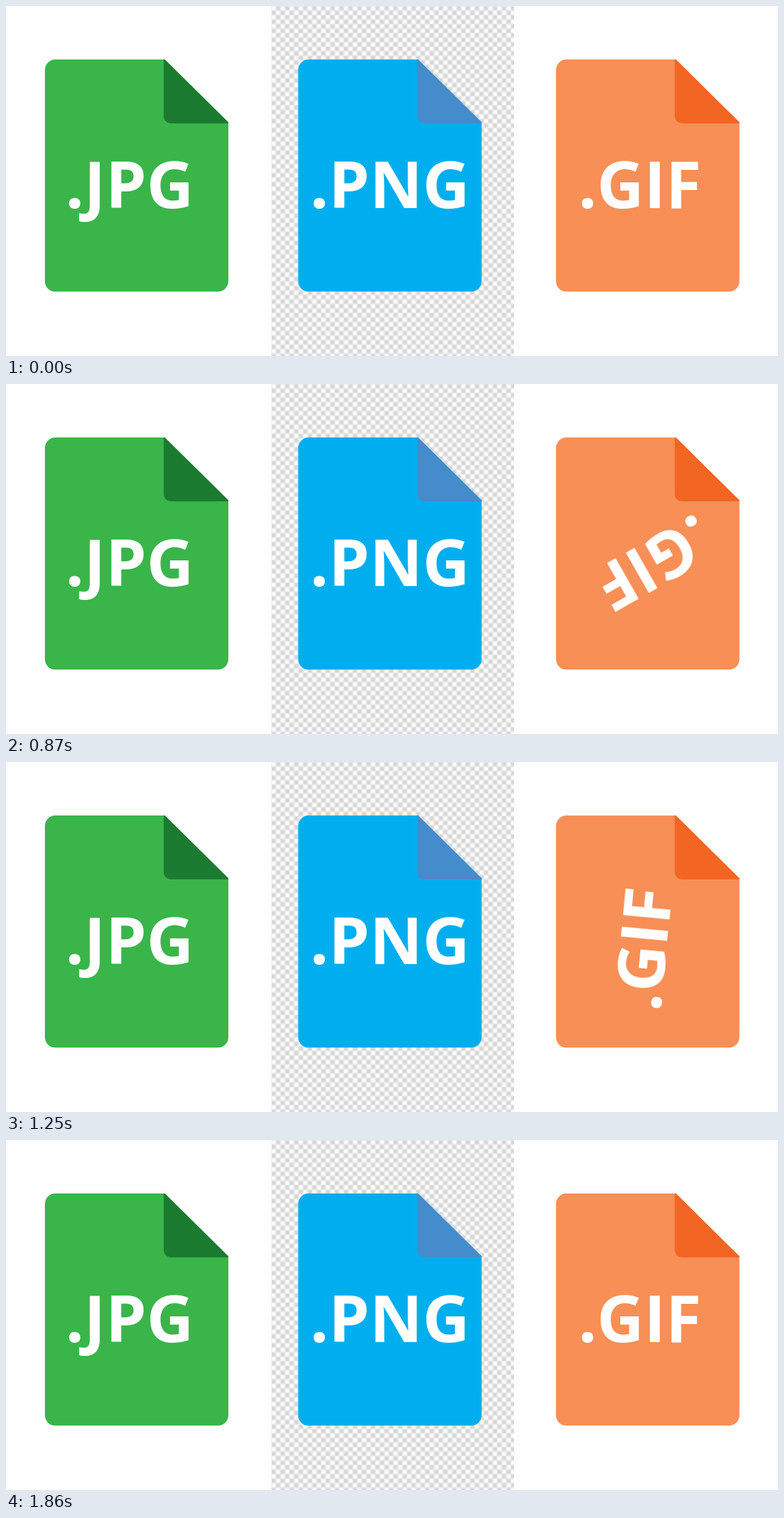
An HTML page without scripts for the animation above (3460 ms loop, 1111 by 504 pixels).

```html
<!DOCTYPE html>
<html lang="en">
<head>
<meta charset="utf-8">
<title>File types</title>
<style>
  html, body { margin: 0; width: 100%; height: 100%; overflow: hidden; background: #fefefe; }
  svg { display: block; width: 100%; height: 100%; }
  text { font: 700 93.8px "Open Sans", sans-serif; font-kerning: none; fill: #fff; }

  .spin { animation: spin 3460ms infinite; }

  /* the label tumbles once, in hard steps, drifting around its centre */
  @keyframes spin {
    0%      { transform: translate(912px, 258px) rotate(0deg);      animation-timing-function: step-end; }
    14.739% { transform: translate(917px, 247px) rotate(24deg);     animation-timing-function: steps(4); }
    21.387% { transform: translate(939.5px, 242.5px) rotate(104deg); animation-timing-function: step-end; }
    23.699% { transform: translate(938px, 250px) rotate(132deg);    animation-timing-function: steps(3); }
    28.034% { transform: translate(924.5px, 272px) rotate(187deg);  animation-timing-function: steps(4); }
    33.525% { transform: translate(925px, 269px) rotate(243.5deg);  animation-timing-function: step-end; }
    34.682% { transform: translate(922px, 271px) rotate(259deg);    animation-timing-function: steps(4); }
    40.173% { transform: translate(903px, 263px) rotate(324.5deg);  animation-timing-function: steps(2); }
    43.063%, 100% { transform: translate(912px, 258px) rotate(360deg); }
  }
</style>
</head>
<body>
<svg viewBox="0 0 1111 504" preserveAspectRatio="none">
  <defs>
    <pattern id="checker" x="388.500" width="13" height="13" patternUnits="userSpaceOnUse">
      <path d="M0 0h6.5v6.5h-6.5z M6.5 6.5h6.5v6.5h-6.5z" fill="#d3d3d3"/>
    </pattern>
    <filter id="soften" x="0" y="0" width="1" height="1">
      <feGaussianBlur stdDeviation="1"/>
    </filter>
    <clipPath id="panel"><rect x="382" width="349" height="504"/></clipPath>
    <path id="page" d="M71 77H228.500L320 167.500V396a15 15 0 0 1-15 15.300H71a15 15 0 0 1-15-15V92a15 15 0 0 1 15-15z"/>
    <path id="fold" d="M228.500 77L320 167.500V169H237a10 10 0 0 1-10-10V77z"/>
  </defs>

  <rect width="1111" height="504" fill="#fefefe"/>
  <g clip-path="url(#panel)">
    <rect x="360" y="-20" width="400" height="544" fill="url(#checker)" filter="url(#soften)"/>
  </g>

  <use href="#page" fill="#39b54a"/>
  <use href="#fold" fill="#1b7b30"/>
  <text x="85.500" y="291">.JPG</text>

  <g transform="translate(364.500)">
    <use href="#page" fill="#00aeef"/>
    <use href="#fold" fill="#448ccb"/>
  </g>
  <text x="437.500" y="291">.PNG</text>

  <g transform="translate(735.500)">
    <use href="#page" fill="#f78f56"/>
    <use href="#fold" fill="#f26522"/>
  </g>
  <g class="spin"><text x="-88.500" y="33">.GIF</text></g>
</svg>
</body>
</html>
```
